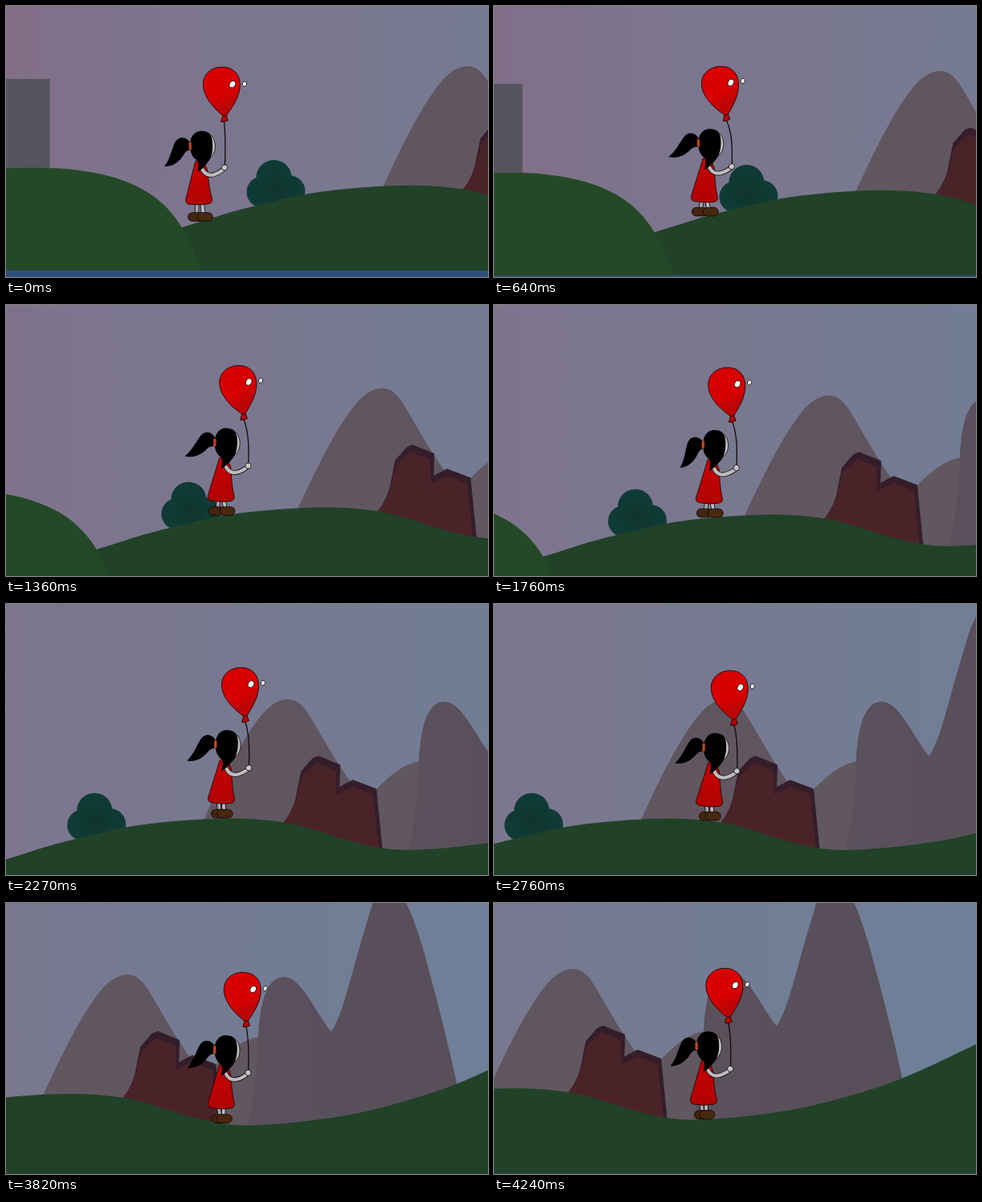
Animation of 600x338 px, one loop 4300 ms. Source, as an HTML page:

```html
<!DOCTYPE html>
<html lang="en">
<head>
<meta charset="utf-8">
<title>Walk with a balloon</title>
<style>
  html, body { margin: 0; width: 100%; height: 100%; overflow: hidden; background: #7b778f; }
  svg { display: block; width: 100vw; height: 100vh; }
  #world { filter: blur(.6px); }
  .ink { stroke: #0a0606; stroke-width: .8; stroke-linejoin: round; }
  .line { fill: none; stroke-linecap: round; }
</style>
</head>
<body>
<svg viewBox="0 0 600 338" preserveAspectRatio="none">
  <defs>
    <linearGradient id="sky" gradientUnits="userSpaceOnUse" x1="0" y1="0" x2="1080" y2="0">
      <stop offset="0" stop-color="#826e87"/>
      <stop offset=".17" stop-color="#7d758d"/>
      <stop offset=".4" stop-color="#79788f"/>
      <stop offset=".6" stop-color="#747b93"/>
      <stop offset="1" stop-color="#6d8199"/>
    </linearGradient>
    <linearGradient id="peak" x1="0" y1="0" x2="0" y2="1">
      <stop offset="0" stop-color="#5f555f"/>
      <stop offset="1" stop-color="#62575f"/>
    </linearGradient>
    <linearGradient id="range" x1="0" y1="0" x2="1" y2="0">
      <stop offset="0" stop-color="#5a515c"/>
      <stop offset="1" stop-color="#574e59"/>
    </linearGradient>
    <radialGradient id="leaf" gradientUnits="userSpaceOnUse" cx="335" cy="228" r="38">
      <stop offset="0" stop-color="#0e352d"/>
      <stop offset="1" stop-color="#103c37"/>
    </radialGradient>
    <linearGradient id="rubber" x1=".3" y1="0" x2=".6" y2="1">
      <stop offset=".55" stop-color="#d90000"/>
      <stop offset=".8" stop-color="#bd0505"/>
    </linearGradient>
    <linearGradient id="cloth" x1="0" y1="0" x2="0" y2="1">
      <stop offset=".2" stop-color="#c20202"/>
      <stop offset="1" stop-color="#b20202"/>
    </linearGradient>
  </defs>

  <g id="world">
    <rect x="-50" y="-120" width="1250" height="520" fill="url(#sky)"/>
    <rect x="-50" y="91" width="104.500" height="160" fill="#55545f"/>
    <path fill="#61575f" d="M680 270V192C696 175 718 153 744 152H775V270Z"/>
    <path fill="url(#peak)" d="M460 246C490 180 515 127 542 94Q558 75 575 75C589 75 598 89 608 107C626 138 640 162 658 186L690 265H460Z"/>
    <path fill="url(#range)" d="M723 268C731 235 736 200 737 162C738 112 747 78 769 78C791 78 807 120 828 146C842 128 854 70 868 25C878 -8 884 -36 899 -36C915 -36 930 0 943 45C957 96 971 150 985 213L990 268Z"/>
    <path fill="#331e2a" stroke="#331e2a" stroke-linejoin="round" d="M560 239Q578 222 584 200L591 165L605 149L612 146L639 157L638 185L655 176L684 187L692 268H560Z"/>
    <path fill="#4a2328" d="M560 239Q578 222 584 200L592 171L610 154L634 164L635 194L655 184L680 194L688 268H560Z"/>
    <g fill="url(#leaf)">
      <circle cx="333.500" cy="214" r="22"/>
      <circle cx="319" cy="232" r="19.500"/>
      <circle cx="353" cy="231" r="19.500"/>
      <rect x="308" y="222" width="56" height="28" rx="9"/>
    </g>
    <path id="ground" fill="#214228"/>
    <path fill="#254926" d="M-50 206Q0 201 50 202C105 203 150 214 182 236C218 262 229 295 244 331H-50Z"/>
    <rect x="-50" y="330" width="1250" height="80" fill="#304e7d"/>
  </g>

  <path id="string" class="line" stroke="#120a0a" stroke-width="1.300"/>

  <g id="legs">
    <path id="legA" class="line" stroke="#0a0606" stroke-width="5.300"/>
    <path id="legA2" class="line" stroke="#a9a7a9" stroke-width="3.700"/>
    <path id="legB" class="line" stroke="#0a0606" stroke-width="5.300"/>
    <path id="legB2" class="line" stroke="#c0bec0" stroke-width="3.700"/>
    <rect id="shoeA" class="ink" x="-9.500" y="-5.300" width="19" height="10.600" rx="5.200" fill="#44250f"/>
    <rect id="shoeB" class="ink" x="-9.500" y="-5.300" width="19" height="10.600" rx="5.200" fill="#482811"/>
  </g>

  <g id="body">
    <g transform="translate(-269 -258.500)">
      <path class="ink" fill="url(#cloth)" d="M266 192C260 212 255 228 251.500 240Q251 246 259 246Q270 248 281 246Q286 244 284 238C281 225 281 212 280 203L275 192Z"/>
      <path class="line" stroke="#0a0606" stroke-width="5.800" d="M274 203Q281 217 299 205"/>
      <path class="line" stroke="#bdbbbd" stroke-width="4.300" d="M274 203Q281 217 299 205"/>
      <circle class="ink" cx="301.800" cy="202" r="3.600" fill="#c9c7c9"/>
      <ellipse class="ink" cx="277.500" cy="174" rx="14" ry="17.500" fill="#c3c0c3"/>
      <path fill="#000" d="M274 155C283 155 287 159 288 167C289 178 287 187 283 192C279 197 274 203 268 206Q270 199 269 192C262 188 260 181 260 173C260 162 266 155 274 155Z"/>
      <path id="tail" fill="#000" d="M0-5C-5-12-13-13-18-6C-23 3-25 15-33 24C-22 25-13 18-8 10C-6 7-3 5 0 5Z"/>
      <rect x="258.500" y="168" width="3.400" height="10" rx="1.500" fill="#b9471d"/>
    </g>
  </g>

  <g id="balloon">
    <path class="ink" fill="#b80404" d="M-1-7L-4 1Q0 2.500 5 0L3-7Z"/>
    <path class="ink" fill="url(#rubber)" d="M-1-6C-8-12-24.500-28-24.500-45C-24.500-59-14-67-1.500-67C12-67 21.500-59 21.500-45C21.500-28 8-13 3-6Z"/>
    <g class="ink" fill="#fff">
      <ellipse rx="3.500" ry="4.500" transform="translate(12 -45) rotate(32)"/>
      <ellipse rx="2.500" ry="3.200" transform="translate(27 -45) rotate(32)"/>
    </g>
  </g>
</svg>
<script>
const LOOP = 4300, LAST = 4240;
const START = 332, STOP = 4180, SPEED = 0.129; // walk interval in ms, px per ms
const LAG = 208, STEP = 10;                    // camera follow time, simulation step
const HOME = { x: 242, y: 263 };

const $ = id => document.getElementById(id);
const clamp = (v, lo, hi) => Math.min(hi, Math.max(lo, v));
const place = (id, x, y, turn = 0) =>
  $(id).setAttribute('transform', `translate(${x.toFixed(2)} ${y.toFixed(2)}) rotate(${turn.toFixed(2)})`);

// Smooth curve through [x, y] points.
function spline(pts) {
  const slope = i => {
    const a = pts[Math.max(0, i - 1)], b = pts[Math.min(pts.length - 1, i + 1)];
    return (b[1] - a[1]) / (b[0] - a[0]);
  };
  return x => {
    x = clamp(x, pts[0][0], pts[pts.length - 1][0]);
    let i = 0;
    while (i < pts.length - 2 && x > pts[i + 1][0]) i++;
    const [x0, y0] = pts[i], [x1, y1] = pts[i + 1];
    const w = x1 - x0, u = (x - x0) / w, u2 = u * u, u3 = u2 * u;
    return y0 * (2 * u3 - 3 * u2 + 1) + y1 * (3 * u2 - 2 * u3)
      + w * (slope(i) * (u3 - 2 * u2 + u) + slope(i + 1) * (u3 - u2));
  };
}

const ground = spline([[150, 298], [200, 282], [242, 269], [282, 256.5], [330, 244.5],
  [377, 234], [430, 227.5], [487, 224], [530, 224.5], [577, 230], [612, 239.5],
  [647, 250.5], [690, 260.5], [731, 263], [807, 256.5], [876, 244.5], [976, 214.5], [1076, 169], [1110, 152]]);

let outline = 'M150 331';
for (let x = 150; x <= 1110; x += 6) outline += `L${x} ${ground(x).toFixed(1)}`;
$('ground').setAttribute('d', outline + 'V331Z');

const lean = spline([[0, -2.7], [300, -2.7], [640, 0.3], [1360, 0], [2760, 0.7], [3390, 0.3], [4240, -0.8]]);
const lift = spline([[0, -3.5], [300, -3], [640, 0], [1760, 0], [2760, 1.4], [3390, 1.2], [4240, 1.6]]);
const sway = spline([[0, -1], [300, -1], [640, -7], [1360, -6], [1760, -5.7], [2760, -4], [3390, -3], [4240, -3]]);
const hang = spline([[0, 0], [640, 0.5], [1360, 1.4], [1760, 1], [2760, 1.6], [3390, 6.7], [4240, -4.2]]);

function walker(t) {
  const x = HOME.x + SPEED * (clamp(t, START, STOP) - START);
  return { x, y: ground(x) - 5 };
}

// The camera trails the girl with exponential smoothing.
const camera = [walker(0)];
for (let t = STEP; t <= LOOP; t += STEP) {
  const c = camera[camera.length - 1], g = walker(t - STEP / 2), k = 1 - Math.exp(-STEP / LAG);
  camera.push({ x: c.x + (g.x - c.x) * k, y: c.y + (g.y - c.y) * k });
}

function cameraAt(t) {
  const i = Math.floor(t / STEP), u = t / STEP - i;
  const a = camera[i], b = camera[i + 1] || a;
  return { x: a.x + (b.x - a.x) * u, y: a.y + (b.y - a.y) * u };
}

function leg(id, hipX, hipY, footX, footY) {
  const d = `M${hipX} ${hipY}L${footX} ${footY}`;
  $(id).setAttribute('d', d);
  $(id + '2').setAttribute('d', d);
}

function draw(t) {
  const cam = cameraAt(t), girl = walker(t);
  const x = girl.x - cam.x + HOME.x, y = girl.y - cam.y + HOME.y;
  place('world', HOME.x - cam.x, camera[0].y - cam.y);

  const stride = Math.cos(Math.PI * (clamp(t, START, STOP) - 640) / 375) ** 2;
  const going = clamp((t - 200) / 400, 0, 1);
  const rise = lift(t) - 2 * (1 - stride) * going;
  const spread = 3 + 4 * stride;

  place('legs', x, y);
  place('shoeA', -spread, 0);
  place('shoeB', spread, 0);
  leg('legA', -4, rise - 15, -1 - spread * 0.6, -5);
  leg('legB', 2, rise - 15, spread * 0.6, -5);

  const turn = lean(t), a = turn * Math.PI / 180;
  place('body', x, y + rise, turn);
  place('tail', 260, 173, hang(t) + 10.5 * Math.cos(2 * Math.PI * (t - 640) / 750) * going);

  const handX = x + 33 * Math.cos(a) + 56 * Math.sin(a);
  const handY = y + rise + 33 * Math.sin(a) - 56 * Math.cos(a);
  const drift = sway(t), knotX = handX + drift, knotY = handY - 59;
  place('balloon', knotX, knotY, drift - 0.8);
  $('string').setAttribute('d', `M${knotX} ${knotY}C${knotX + 1 - drift * 0.9} ${knotY + 16} ${handX + 1} ${knotY + 34} ${handX} ${handY}`);
}

const begin = performance.now();
function tick() {
  draw(Math.min((performance.now() - begin) % LOOP, LAST));
  requestAnimationFrame(tick);
}
tick();
</script>
</body>
</html>
```
